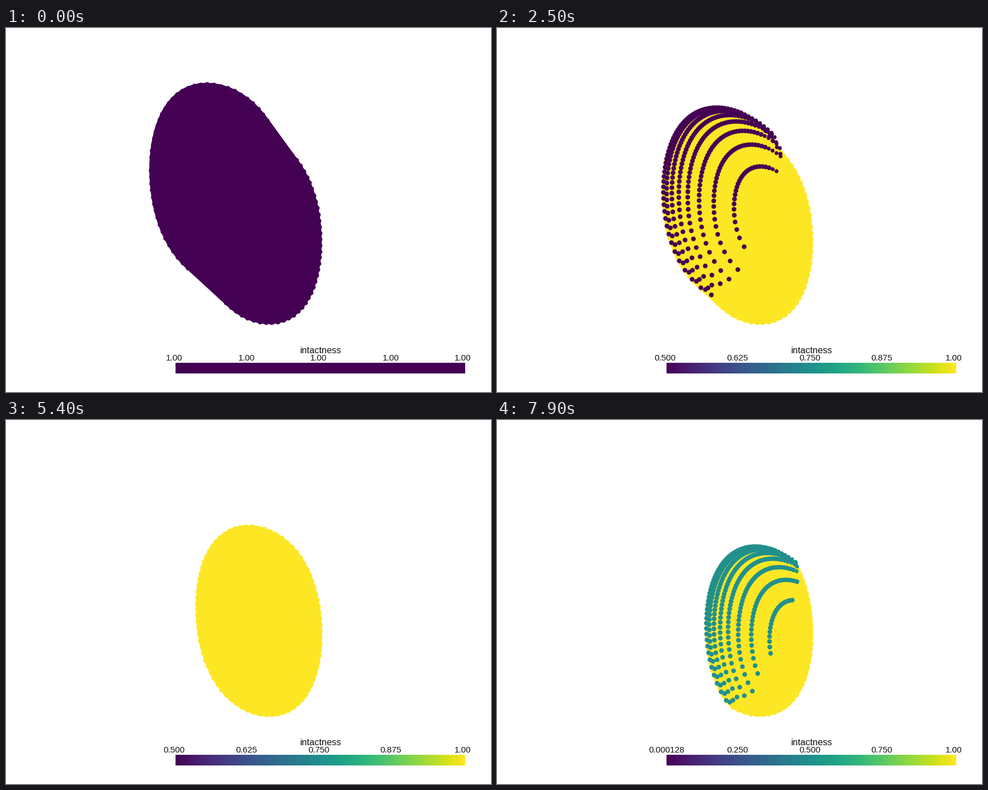
Recreate the animation shown at these times as a matplotlib script. Size 864 by 648 pixels, loop 8 s.

```python
import numpy as np
import matplotlib.pyplot as plt
from matplotlib.animation import FuncAnimation
from matplotlib.collections import PolyCollection
from matplotlib.path import Path

W, H, DPI = 864, 648, 100
FRAMES, STEP_MS = 80, 100
PX = 72 / DPI
CMAP = plt.get_cmap("viridis")

# The front face is a dome of particle rings that retreats layer by layer
# towards a vanishing point; its outline at RIM_LAYER is the fixed far rim.
RIM_LAYER = 18
CENTER = np.array([450.0, 357.0])
HALF_W, HALF_H, SHEAR = 109.5, 167.0, 0.14
DOME = np.array([73.0, 18.0])
VANISH = np.array([1330.0, 1350.0])
RINGS = 8


def pack(t):
    """Gap between ring dots: tight at the upper left, loose below."""
    return 4.5 + 19 * np.sin((t - np.radians(115)) / 2) ** 2


def ring(height, gap):
    """Points and angles of the dome ring at a height of 0 (base) to 1."""
    rho = np.sqrt(1 - height**2)
    angles, t = [], 0.7
    while t < 0.7 + 2 * np.pi:
        angles.append(t)
        t += gap(t) / (rho * np.hypot(HALF_W * np.sin(t), HALF_H * np.cos(t)))
    t = np.array(angles)
    swell = rho * (1 + 0.025 * np.sin(2 * t) ** 2)
    x = HALF_W * np.cos(t)
    y = HALF_H * (SHEAR * np.cos(t) - np.sqrt(1 - SHEAR**2) * np.sin(t))
    pts = CENTER + height * DOME + swell[:, None] * np.column_stack([x, y])
    return pts, t


def recede(p, layer):
    """Perspective shift of points from the rim layer to another layer."""
    rate = 0.00401 + (p - CENTER) @ np.array([-2.4e-6, 0.56e-6])
    s = ((layer - RIM_LAYER) * rate)[:, None]
    return (p + s * VANISH) / (1 + s)


def in_view(p):
    """True on the near side of the bulging edge that hides the dome."""
    axis = np.array([-0.374, 0.927])
    d = p - (487, 383)
    u, v = d @ axis, d @ axis[::-1] * (1, -1)[0] if False else d @ np.array([0.927, 0.374])
    return v < 16.5 - 40 * np.abs(u / 153) ** 6


def lens(a, b):
    """Outline of the overlap of two convex outlines."""
    pts = np.vstack([a[Path(b).contains_points(a)],
                     b[Path(a).contains_points(b)]])
    d = pts - pts.mean(axis=0)
    return pts[np.argsort(np.arctan2(d[:, 1], d[:, 0]))]


heights = 0.866 * (1 - np.arange(RINGS) / (RINGS - 1)) ** 1.3
rings = [ring(h, pack) for h in heights]
FACE = np.vstack([p for p, _ in rings])
RADIUS = np.where(np.concatenate([t for _, t in rings]) < 1.4, 3.5, 4.2)
RIM, _ = ring(0, lambda t: 11)


def silhouette(layer):
    """Polygons filling the body and the particles along its edge."""
    edge = recede(RIM, layer)
    if layer > RIM_LAYER:
        edge = lens(edge, RIM)
        return [edge], edge
    sweep = [recede(RIM, j) for j in range(layer, RIM_LAYER + 1)]
    return sweep, np.vstack([edge, RIM])


def state(i):
    """Lowest value overall and value of the front layer."""
    layer, phase = divmod(i, 3)
    tiny = 0.000167 if i < 70 else 0.000128
    value = (1.0, 0.5, tiny)[phase]
    if layer < RIM_LAYER:
        return value, value
    return (0.5 if i == 3 * RIM_LAYER else tiny), value


def label(v):
    if v >= 0.9995:
        return "1.00"
    return f"{v:.3f}" if v > 0.01 else f"{v:.6f}"


fig = plt.figure(figsize=(W / DPI, H / DPI), dpi=DPI, facecolor="white")
ax = fig.add_axes([0, 0, 1, 1])
RAMP = np.linspace(0, 1, 256)[None, :]
bar = ax.imshow(RAMP, cmap=CMAP, vmin=0, vmax=1, aspect="auto",
                extent=(302, 818, 615, 596), interpolation="nearest")
ax.set_xlim(0, W)
ax.set_ylim(H, 0)
ax.axis("off")

body = ax.add_collection(PolyCollection([], lw=6 * PX, joinstyle="round",
                                        zorder=2), autolim=False)
bumps = ax.scatter([], [], s=(8.4 * PX) ** 2, lw=0, zorder=3)
dots = ax.scatter([], [], lw=0, zorder=4)

TEXT = dict(family="Liberation Sans", color="#111111", ha="center",
            va="baseline", zorder=5)
ax.text(561, 579, "intactness", fontsize=16.4 * PX, **TEXT)
ticks = [ax.text(300 + 128.5 * n, 591.5, "", fontsize=15.3 * PX, **TEXT)
         for n in range(5)]


def update(i):
    layer = i // 3
    low, value = state(i)
    flat = low == 1.0
    tone = CMAP(0.0 if flat else 1.0)

    polygons, edge = silhouette(layer)
    body.set_verts(polygons)
    body.set_color(tone)
    bumps.set_offsets(edge)
    bumps.set_color(tone)

    face = recede(FACE, layer)
    seen = in_view(recede(FACE, max(layer, RIM_LAYER)))
    dots.set_visible(value < 1)
    dots.set_offsets(face[seen])
    dots.set_sizes((2 * RADIUS[seen] * PX) ** 2)
    dots.set_color(CMAP(0.0 if flat else (value - low) / (1 - low)))

    bar.set_data(RAMP * (not flat))
    for n, tick in enumerate(ticks):
        tick.set_text(label(low + (1 - low) * n / 4))
    ticks[0].set_x(302.5 if low < 0.01 else 299.5)
    return body, bumps, dots, bar, *ticks


anim = FuncAnimation(fig, update, frames=FRAMES, interval=STEP_MS,
                     repeat=True, repeat_delay=0, blit=False)
plt.show()
```
